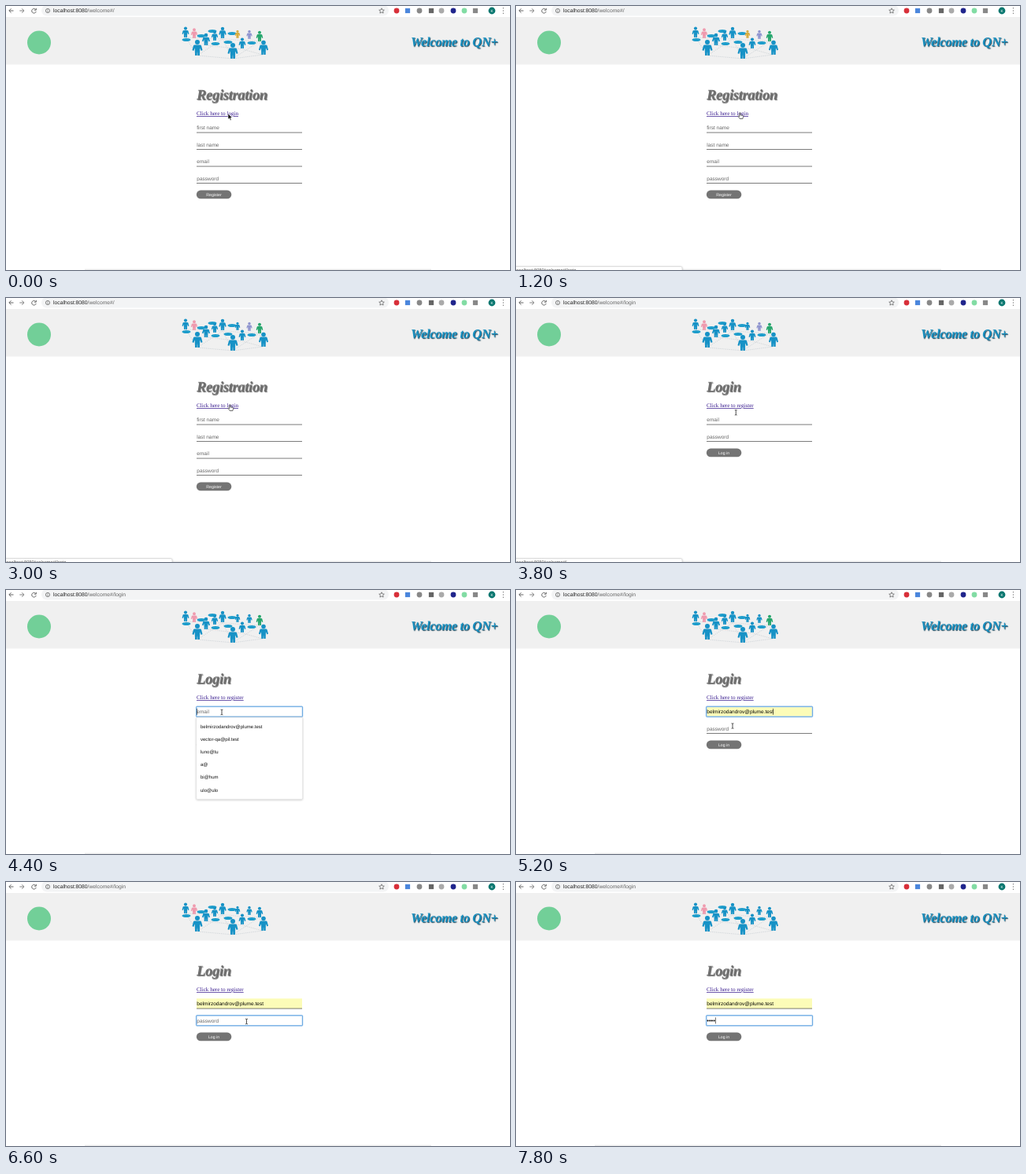
Write an HTML page that moves like this. It is 640x336 px and loops after 8 s.

```html
<!DOCTYPE html>
<html lang="en">
<head>
<meta charset="utf-8">
<title>Registration and login</title>
<style>
  html, body { margin: 0; width: 100%; height: 100%; overflow: hidden; background: #fff; }
  svg { display: block; width: 640px; height: 336px; }
  text { font: 6.5px "Liberation Sans", Arial, sans-serif; white-space: pre; text-rendering: geometricPrecision; }
  .title { font: italic bold 18.6px "Liberation Serif", "Times New Roman", serif; letter-spacing: -.35px;
    fill: #707070; text-shadow: .8px .8px 1px #666; }
  .brand { font-size: 16.5px; fill: #168fc0; text-shadow: .8px .8px 1px #245; }
  .link { font: 7.1px "Liberation Serif", "Times New Roman", serif; fill: #35178c; text-decoration: underline; }
  .hint { fill: #666; }
  .button { font-size: 5.2px; fill: #fff; text-anchor: middle; }
  .url { font-size: 6.75px; fill: #222; }
  .url tspan { fill: #666; }
  .status { font-size: 5.7px; fill: #555; }
  .row { font-size: 6.04px; fill: #111; }
  .dots { font-size: 7.6px; }
</style>
</head>
<body>
<svg viewBox="0 0 640 336">
  <defs>
    <g id="man">
      <circle cy="-17.3" r="3.1"/>
      <path d="M-3.4-13.8h6.8q1.4 0 1.8 1.3l1.5 5.6-1.9.7-1.5-3.6L3 0H.4l-.4-5.6L-.4 0H-3l-.3-9.8-1.5 3.6-1.9-.7 1.5-5.6q.4-1.3 1.8-1.3z"/>
    </g>
    <filter id="drop" x="-10%" y="-10%" width="120%" height="125%">
      <feDropShadow dx="0" dy=".7" stdDeviation=".8" flood-opacity=".25"/>
    </filter>
    <linearGradient id="dock" x2="0" y2="1">
      <stop stop-color="#fff"/><stop offset="1" stop-color="#e6e6e6"/>
    </linearGradient>
  </defs>

  <!-- browser toolbar -->
  <rect x="45" y="-1" width="441" height="13.5" rx="6.7" fill="#f3f4f5"/>
  <g fill="none" stroke="#555" stroke-width=".9">
    <path d="M9.5 6H4M6.5 3.3 3.8 6l2.7 2.7"/>
    <path d="M17.3 6h5.5M20.2 3.3 22.9 6l-2.7 2.7" stroke="#777"/>
    <path d="M37.6 4.4A2.8 2.8 0 1 0 38.2 7M38.3 2.8v2.4h-2.4"/>
    <circle cx="53" cy="6" r="2.6" stroke-width=".7"/>
    <path d="M53 5.6v2M53 4.2v.7" stroke-width=".7"/>
    <path d="m477 2.8 1 2.2 2.3.2-1.7 1.6.5 2.3-2.1-1.2-2.1 1.2.5-2.3-1.7-1.6L476 5z" stroke-width=".7"/>
  </g>
  <text class="url" x="60" y="8.4">localhost:8080<tspan id="path"></tspan></text>
  <g id="icons"></g>
  <circle cx="617" cy="6" r="4.4" fill="#08766f"/>
  <text x="617" y="7.7" fill="#fff" text-anchor="middle" style="font-size:4.8px">K</text>
  <path d="M630.9 2.8h1.1M630.9 6h1.1M630.9 9.2h1.1" stroke="#555" stroke-width="1.1"/>

  <!-- page header -->
  <rect y="14" width="640" height="60.5" fill="#f0f0f0"/>
  <circle cx="42" cy="46.5" r="15" fill="#72cf98"/>
  <path d="M228 40 243 63 288 67 326 62 322 45 275 42 228 40M243 63 275 42 288 67 322 45M254 50 300 55 326 62"
    fill="none" stroke="#b9c2c8" stroke-width=".6" stroke-dasharray="1.2 1.2"/>
  <g id="crowd"></g>
  <text class="title brand" x="514" y="51">Welcome to QN+</text>

  <!-- form -->
  <text class="title" id="heading" x="242" y="119"></text>
  <text class="link" id="link" x="242" y="139.2"></text>
  <g id="form"></g>

  <rect x="100" y="334" width="440" height="2" fill="url(#dock)"/>
  <g id="status">
    <rect x="-2" y="331.6" width="213" height="8" rx="1.5" fill="#fff" stroke="#c8c8c8" stroke-width=".6" filter="url(#drop)"/>
    <text class="status" y="337.6" x="-1"></text>
  </g>
  <g id="cursor"></g>
</svg>
<script>
const $ = id => document.getElementById(id);
const LOOP = 8000, STEP = 200;
const MAIL = 'belmirzodandrov@plume.test';
const MAILS = [MAIL, 'vector-qa@pil.test', 'luno@tu', 'a@', 'bi@hum', 'ulo@ulo'];

const box = (x, y, w, h, attrs) => `<rect x="${x}" y="${y}" width="${w}" height="${h}" ${attrs}/>`;
const text = (x, y, cls, str) => `<text x="${x}" y="${y}" class="${cls}">${str}</text>`;
const set = (el, html) => { if (el.markup !== html) el.innerHTML = el.markup = html; };

const CURSORS = {
  arrow: '<path d="M0 0v7.2l1.7-1.5 1.2 2.7 1.2-.5L3 5.3h2.2z" fill="#111" stroke="#fff" stroke-width=".5"/>',
  hand: '<path d="M-.6.2Q0-.5.6.2v2.6l3 .7q.7.3.5 1.2L3.4 7.5H-.3L-2.5 4.4q.2-.9 1.1-.3l.8.6z" fill="#fff" stroke="#222" stroke-width=".65"/>',
  beam: '<path d="M-1.4-3.3Q0-3.3 0-2.5V2.5Q0 3.3-1.4 3.3M1.4-3.3Q0-3.3 0-2.5M0 2.5Q0 3.3 1.4 3.3" fill="none" stroke="#222" stroke-width=".8"/>'
};

// time, x, y of the pointer
const TRACK = [[0, 282, 137], [200, 283, 136.5], [1200, 284.5, 136], [3600, 284.5, 136],
  [4000, 274, 155.5], [4400, 274, 155.5], [4800, 275, 173], [5200, 275, 173], [6000, 305.5, 177.5], [LOOP, 305.5, 177.5]];

function pointer(t) {
  const i = TRACK.findIndex(p => p[0] > t);
  const [t0, x0, y0] = TRACK[i - 1], [t1, x1, y1] = TRACK[i];
  const u = (t - t0) / (t1 - t0), k = u * u * (3 - 2 * u);
  return [x0 + (x1 - x0) * k, y0 + (y1 - y0) * k];
}

function field(i, label, { value = '', fill = 'none', focus = false, caret = 0, cls = '' } = {}) {
  const y = 148.3 + 21.5 * i;
  return box(242, y, 134, 12.8, `fill="${fill}"`)
    + (focus
      ? box(241.7, y, 134.8, 13, 'rx=".8" fill="none" stroke="#bcd9f6" stroke-width="1.8"')
        + box(241.7, y, 134.8, 13, 'rx=".8" fill="none" stroke="#5a9fdc" stroke-width=".8"')
      : box(242, y + 12.4, 134, .7, 'fill="#444"'))
    + text(242.3, y + 9, value ? cls : 'hint', value || label)
    + (caret ? box(caret, y + 2.6, .6, 8, 'fill="#111"') : '');
}

const button = (y, label) => box(241.8, y, 44.5, 10.6, 'rx="5.3" fill="#747474"') + text(264, y + 7.1, 'button', label);

function suggestions(hover) {
  return box(241.7, 162, 135, 104.3, 'rx="1.5" fill="#fff" stroke="#d2d2d2" stroke-width=".5" filter="url(#drop)"')
    + (hover ? box(242, 166, 134.4, 16, 'fill="#eee"') : '')
    + MAILS.map((m, i) => text(247, 176 + 16.1 * i, 'row', m)).join('');
}

function loginForm(t) {
  const hover = t >= 4800, typed = Math.max(0, Math.min(4, (t - 7000) / STEP));
  const open = t >= 4400 && t < 5000, focusPassword = t >= 6200;
  const mail = {
    value: hover ? MAIL : '', fill: hover ? '#fcfcb8' : 'none',
    focus: t >= 4200 && !focusPassword,
    caret: t >= 5000 && !focusPassword ? 326 : t >= 4200 && !hover ? 242.2 : 0
  };
  const password = {
    value: '•'.repeat(typed), cls: 'dots', focus: focusPassword,
    caret: t >= 7000 || focusPassword && t < 6600 ? 242.4 + 2.75 * typed : 0
  };
  return field(0, 'email', mail) + field(1, 'password', password) + button(191.6, 'Log in')
    + (open ? suggestions(hover) : '');
}

const registerForm = ['first name', 'last name', 'email', 'password']
  .map((label, i) => field(i, label)).join('') + button(234.6, 'Register');

const BLUE = '#1792c6';
function crowd(t) {
  const until = (end, color) => t < end ? color : BLUE;
  const men = [
    [228, 40, .66], [239, 41, .62, '#ef9aae'], [265, 44, .62], [275, 41, .7], [294, 41, .5, until(1400, '#d8ad3e')],
    [309, 42, .55, until(4200, '#9095cf')], [322, 45, .65, until(6200, '#27a66d')], [254, 50, .75],
    [300, 54, .66], [243, 63, .98], [288, 67, .98], [327, 62, .9]
  ];
  const clouds = [[262, 32], [282, 46], [248, 38], [312, 47], [287, 35], [229, 43], [266, 48]];
  return clouds.map(([x, y]) => `<ellipse cx="${x}" cy="${y}" rx="5.5" ry="2.1" fill="#1e9dcb"/>`).join('')
    + men.map(([x, y, s, c = BLUE]) => `<use href="#man" transform="translate(${x} ${y}) scale(${s})" fill="${c}"/>`).join('');
}

$('icons').innerHTML = [[496, '#d8303a'], [510, '#4b86dc', 1], [525, '#888'], [540, '#666', 1],
  [553, '#aaa'], [568, '#20258c'], [582, '#82dca4'], [596, '#888', 1]]
  .map(([x, c, square]) => square ? box(x - 3.1, 2.9, 6.2, 6.2, `fill="${c}"`) : `<circle cx="${x}" cy="6" r="3.4" fill="${c}"/>`).join('');

function draw(now) {
  const t = Math.floor(now % LOOP / STEP) * STEP;
  const login = t >= 1400 && t < 2400 || t >= 3400;
  const toRegister = t >= 1600 && t < 2600 || t >= 3600;

  set($('path'), '/welcome#/' + (login ? 'login' : ''));
  set($('heading'), login ? 'Login' : 'Registration');
  set($('link'), 'Click here to ' + (login ? 'register' : 'login'));
  set($('form'), login ? loginForm(t) : registerForm);
  set($('crowd'), crowd(t));

  $('status').style.display = t >= 400 && t < 4200 ? '' : 'none';
  set($('status').lastElementChild, 'localhost:8080/welcome#/' + (toRegister ? '' : 'login'));

  const kind = t < 200 ? 'arrow' : t < 3800 ? 'hand' : t >= 4600 && t < 5000 ? 'arrow' : 'beam';
  set($('cursor'), t < 7000 ? CURSORS[kind] : '');
  $('cursor').setAttribute('transform', `translate(${pointer(t)})`);
  requestAnimationFrame(() => draw(performance.now() - start));
}

const start = performance.now();
draw(0);
</script>
</body>
</html>
```
